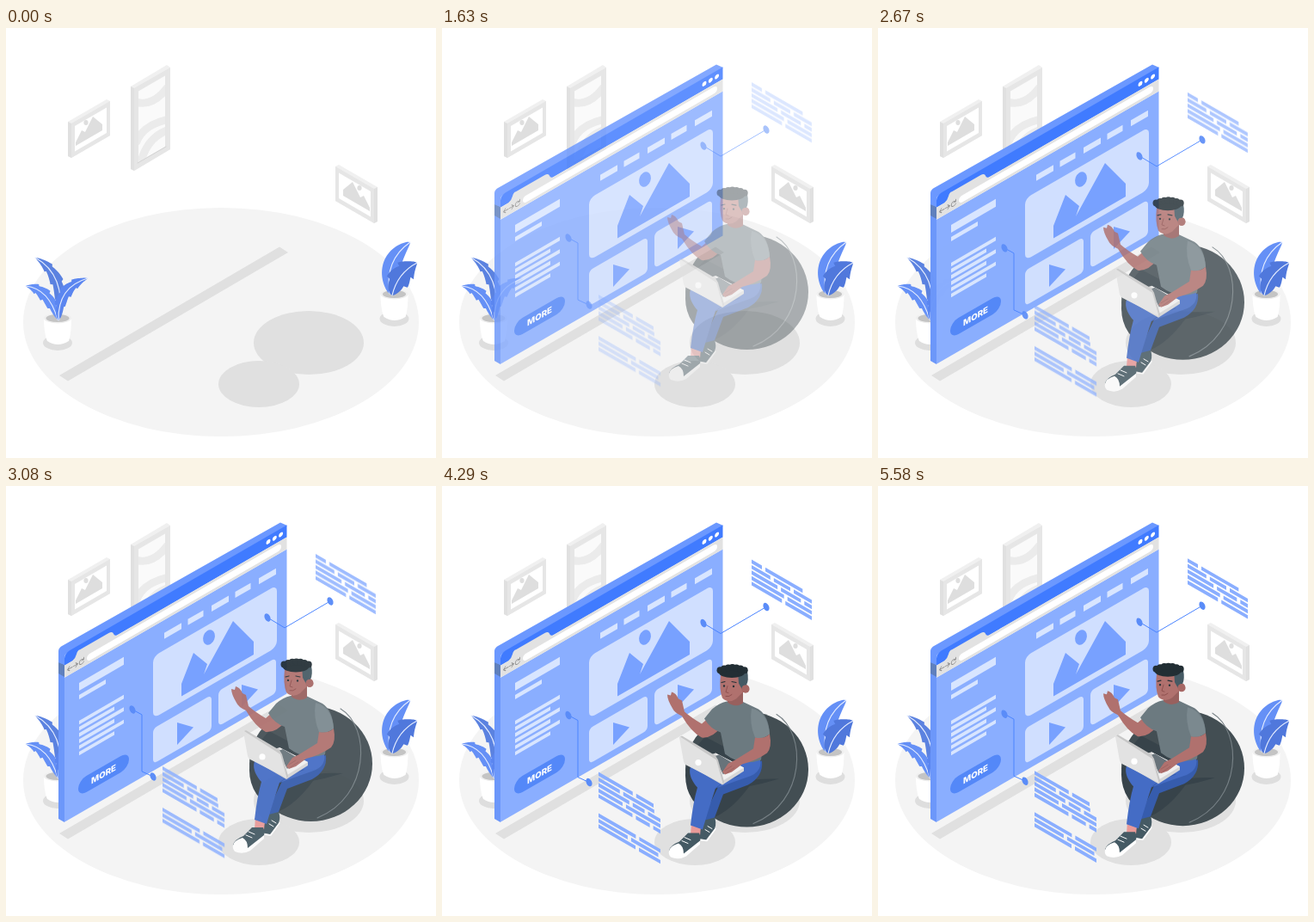
An HTML page for the animation above (5.62 s loop, 500 px wide and 500 px high).

```html
<!DOCTYPE html>
<html lang="en">
<head>
<meta charset="utf-8">
<title>Isometric web page scene</title>
<style>
html, body { margin: 0; width: 100%; height: 100%; overflow: hidden; background: #fff; }
svg { display: block; width: 100vw; height: 100vh; }
text { font: 800 9.7px Inter, "Open Sans", sans-serif; fill: #fff; text-anchor: middle; }
.line { fill: none; stroke-linecap: round; stroke-linejoin: round; }
</style>
</head>
<body>
<svg viewBox="0 0 500 500">
  <ellipse cx="250" cy="342" rx="230" ry="133" fill="#f4f4f4"/>
  <g fill="#e0e0e0">
    <path d="M62 404 318 254.500 328 261 72 410.500Z"/>
    <ellipse cx="352" cy="366" rx="64" ry="37"/>
    <ellipse cx="294" cy="414" rx="47" ry="27"/>
  </g>

  <!-- wall pictures -->
  <g id="picture">
    <path d="M72 109 117 83 121 85V125L76 151 72 149Z" fill="#f0f0f0"/>
    <path d="M72 109 76 111V151L72 149Z" fill="#e0e0e0"/>
    <path d="M76 111 121 85V125L76 151Z" fill="#e6e6e6"/>
    <path d="M80 114 117 92.500V122L80 143.500Z" fill="#fff"/>
    <path d="M81 133 88 119 92 121 101 103 112 112V119L81 137Z" fill="#dedede"/>
    <ellipse cx="93" cy="110" rx="2.600" ry="3" fill="#dedede"/>
  </g>
  <use href="#picture" transform="matrix(-1 0 0 1 504 76)"/>

  <!-- mirror -->
  <path d="M145 68 187 43 191 46V141L149 166 145 164Z" fill="#f0f0f0"/>
  <path d="M145 68 149 70V166L145 164Z" fill="#e0e0e0"/>
  <path d="M149 70 191 46V141L149 166Z" fill="#e6e6e6"/>
  <clipPath id="glass"><path d="M154 73.500 185 55.500V138L154 156Z"/></clipPath>
  <g clip-path="url(#glass)">
    <path d="M150 50H190V160H150Z" fill="#fafafa"/>
    <g class="line" stroke="#ebebeb" stroke-width="9">
      <path d="M150 86Q170 92 187 70M152 132Q160 112 190 106M158 152Q166 126 190 118"/>
    </g>
  </g>
  <path d="M153 157 186 138" class="line" stroke="#d4d4d4"/>

  <!-- plants -->
  <g id="pot">
    <ellipse cx="60" cy="366" rx="17" ry="9" fill="#dedede"/>
    <path d="M44 338C44 350 46 360 48 364Q60 372 73 364C75 358 76 348 76 338Z" fill="#fff"/>
    <ellipse cx="60" cy="337.500" rx="16" ry="6" fill="#f0f0f0"/>
    <ellipse cx="60" cy="337.500" rx="13.500" ry="4.600" fill="#c4c4c4"/>
  </g>
  <use href="#pot" x="391.500" y="-28"/>
  <g id="leaves"></g>

  <g id="page">
    <path d="M61 192 68 195V391L61 387Z" fill="#6c97fa"/>
    <path d="M61 205 68 208V222L61 218Z" fill="#5f80bd"/>
    <path d="M61 205V192Q61 188 66 185.500L319 42.500 327 46 71 194Q68 196 68 200V208Z" fill="#6b98ff"/>
    <g id="front" transform="matrix(1 -.57735 0 1 68 194.700)">
      <path d="M0 28H258.500V196H0Z" fill="#8aaeff"/>
      <path d="M0 14V6Q0 0 6 0H258.500V14Z" fill="#407bff"/>
      <path d="M0 14H9Q13 13 14 9T18 6H51Q56 6 57 10T62 14H258.500V28H0Z" fill="#e2e2e2"/>
      <rect x="26" y="17" width="226" height="8" rx="4" fill="#fff"/>
      <g class="line" stroke="#8a8a8a" stroke-width=".8">
        <path id="arrow" d="M9 21H3.500L6 18.500M3.500 21 6 23.500"/>
        <use href="#arrow" transform="matrix(-1 0 0 1 19 0)"/>
        <path d="M22 19.500A2.700 2.700 0 1 0 22.500 22M22.500 17.500V20H20"/>
      </g>
      <path d="M237 7H252" stroke="#fff" stroke-width="5" stroke-linecap="round" stroke-dasharray="0 7.300"/>
      <g fill="#d0dfff">
        <rect x="103" y="63" width="144" height="72" rx="7"/>
        <rect x="103" y="147" width="68" height="41" rx="5"/>
        <rect x="179" y="147" width="67" height="41" rx="5"/>
      </g>
      <rect x="16" y="157" width="59" height="19" rx="9.500" fill="#5488f8"/>
      <text x="45.500" y="170">MORE</text>
    </g>
    <g fill="#78a1ff">
      <path d="M204 244.500V230L218 194 234 207 230 219 264 157 288 181V196Z"/>
      <ellipse cx="236" cy="176" rx="6.600" ry="9" transform="rotate(20 236 176)"/>
      <path id="play" d="M199 275 218 280.500 199 301Z"/>
      <use href="#play" x="75" y="-44"/>
    </g>
  </g>

  <g id="links">
    <path d="M304 158 324 170 377 139M147 265 158 271V337L171 343" class="line" stroke="#4a84ff"/>
    <g fill="#5a8cf8">
      <ellipse id="dot" cx="304" cy="158" rx="3.200" ry="5" transform="rotate(-25 304 158)"/>
      <use href="#dot" x="73" y="-19"/><use href="#dot" x="-157" y="107"/><use href="#dot" x="-133" y="185"/>
    </g>
  </g>
  <g id="notes" fill="#8aaeff">
    <g id="noteA" transform="matrix(1 .57735 0 1 360 84)"></g>
    <g id="noteB" transform="matrix(1 .57735 0 1 182 331)"></g>
  </g>

  <g id="person">
    <!-- bean bag -->
    <ellipse cx="354.500" cy="328" rx="71.500" ry="67" fill="#434e53"/>
    <path d="M283 335Q284 313 306 290L372 325Q345 372 316 384Q283 367 283 335Z" fill="#37434a"/>
    <path d="M311 353Q350 352 392 339Q365 338 340 343" fill="#37434a"/>
    <path d="M389 264C424 285 424 366 362 391" class="line" stroke="#778186" stroke-width="1.100"/>

    <!-- legs and shoes -->
    <path d="M304 386 316 381Q320 390 317 397L307 410 297 408Z" fill="#455a64"/>
    <path d="M318 397 308 411 299 410" class="line" stroke="#fff" stroke-width="1.500"/>
    <path d="M326 338 372 318Q374 336 356 346L327 357 317 384 302 388Z" fill="#365cad"/>
    <path d="M290 390 301 394 300 405 289 404Z" fill="#e99a98"/>
    <path d="M369 312Q375 331 355 337L318 350Q311 371 303 398L289 393Q292 366 297 349C287 338 284 324 296 318L335 322Z" fill="#446cc5"/>
    <path d="M318 350Q330 340 346 335" class="line" stroke="#365cad"/>
    <path d="M264 422Q266 416 276 412L286 402 299 402Q302 408 299 414L282 428 267 428Z" fill="#455a64"/>
    <path d="M264 423Q265 417 275 414Q281 417 281 426L300 411V415L284 429Q275 434 266 430Q263 427 264 423Z" fill="#fff"/>
    <path d="M279 411 286 414M282 407 289 410M306 398 311 401M309 394 314 397" class="line" stroke="#fff"/>

    <!-- raised arm -->
    <path d="M310 268 325 278Q315 292 302 291Q290 285 279 266Q270 262 268 257Q262 247 262 241L266 242 267 238Q272 239 275 246L279 248 282 261Q290 268 302 275Z" fill="#b0716e"/>

    <!-- shirt -->
    <path d="M331 249Q322 251 314 258L305 269Q312 281 324 285L329 310Q348 325 371 317L374 291 381 287Q380 266 368 258L349 249Z" fill="#6c7a80"/>
    <path d="M360 257Q379 262 381 287Q373 293 364 291Q357 274 360 257Z" fill="#7b898f"/>

    <!-- head -->
    <path d="M332 240 350 235V251Q341 257 332 250Z" fill="#98605e"/>
    <path d="M324 218Q322 235 326 245Q333 252 342 246L350 238Q357 239 357 233Q356 228 351 230L350 215Z" fill="#b0716e"/>
    <path d="M344 214H355Q357 224 354 230L350 231 349 235 345 228Z" fill="#455a64"/>
    <circle cx="353" cy="234.500" r="4.600" fill="#a76865"/>
    <g id="hair" fill="#222e34"><ellipse cx="337" cy="215.500" rx="15" ry="6"/></g>
    <path d="M328 231h0M339 231.500h0" class="line" stroke="#263238" stroke-width="2.400"/>
    <path d="M325 227 329 226M337 226 342 227" class="line" stroke="#263238" stroke-width="1.100"/>
    <path d="M332 231 330 238 333 239M330 243Q334 244 337 241" class="line" stroke="#8c4d4c" stroke-width=".9"/>

    <!-- laptop -->
    <path d="M283 321 318 309 351 326V330L326 346Z" fill="#d6d6d6"/>
    <path d="M318 309 351 326 327 341Z" fill="#f0f0f0"/>
    <path d="M316 313 322 311 339 321 327 334Z" fill="#68737a"/>
    <path d="M276 291Q276 289 279 290L317 313Q319 314 320 317L327 345 284 323Q282 322 281 319Z" fill="#e2e2e2"/>
    <path d="M277 290 279 289 318 312 321 317 328 342 327 346 319 317Z" fill="#c7c7c7"/>
    <circle cx="298" cy="320" r="3.600" fill="#fff"/>

    <!-- typing arm -->
    <path d="M364 291Q374 293 381 287Q384 302 378 309Q365 318 349 322L337 331 329 334 326 331 333 321 341 317 362 304Z" fill="#b0716e"/>
    <path d="M329 329 337 324M331 332 340 326" class="line" stroke="#98605e" stroke-width=".8"/>
  </g>
</svg>
<script>
const LOOP = 5620, DROP = 30;
const $ = id => document.getElementById(id);

function add(parent, tag, attrs) {
  const el = document.createElementNS("http://www.w3.org/2000/svg", tag);
  for (const key in attrs) el.setAttribute(key, attrs[key]);
  $(parent).append(el);
}

let seed = 7;
const random = () => (seed = seed * 16807 % 2147483647) / 2147483647;

function bar(parent, x, y, width, height, fill) {
  add(parent, "rect", { x, y, width, height, ...(fill && { fill }) });
}

// Lines of words with random breaks, filling a column.
function lines(parent, count, top, width) {
  for (let row = 0; row < count; row++)
    for (let x = 0; x < width - 8;) {
      const length = Math.min(12 + random() * 34, width - x);
      bar(parent, x, top + row * 6.4, length, 4.4);
      x += length + 4;
    }
}

// A curved leaf; cuts is the number of notches along each edge.
function leaf(base, bend, tip, width, cuts, fill) {
  const left = [], right = [], steps = 48;
  for (let i = 0; i <= steps; i++) {
    const t = i / steps, u = 1 - t;
    const [x, y] = [0, 1].map(k => u * u * base[k] + 2 * u * t * bend[k] + t * t * tip[k]);
    const [dx, dy] = [0, 1].map(k => u * (bend[k] - base[k]) + t * (tip[k] - bend[k]));
    const half = width * Math.sin(Math.PI * t) ** .7 * (1 - .35 * (t * cuts % 1)) / Math.hypot(dx, dy);
    left.push([x - dy * half, y + dx * half]);
    right.unshift([x + dy * half, y - dx * half]);
  }
  add("leaves", "path", { d: `M${left.concat(right).join(" ")}Z`, fill });
  add("leaves", "path", { d: `M${base}Q${bend} ${tip}`, class: "line", stroke: "#e5edff", "stroke-width": 1.1 });
}

leaf([62, 339], [70, 287], [34, 267], 8, 4, "#5b82e0");
leaf([60, 339], [50, 303], [23, 300], 8, 4, "#6590f6");
leaf([61, 340], [60, 301], [95, 291], 8, 4, "#5b86f0");
leaf([446, 309], [440, 270], [470, 249], 10, 0, "#6590f6");
leaf([449, 311], [455, 285], [478, 273], 15, 3, "#5078dc");

// Menu, headings and paragraph on the page.
const pale = "#d8e5ff";
for (let i = 0; i < 5; i++) bar("front", 116 + i * 27.5, 43, i % 2 ? 18 : 20, 7, pale);
bar("front", 17, 44, 52, 9, pale);
bar("front", 17, 58, 31, 5, pale);
for (let i = 0; i < 6; i++) bar("front", 17, 88 + i * 7.2, i % 2 ? 41 : 52, 4.4, pale);

lines("noteA", 5, 0, 70);
lines("noteB", 5, 0, 72);
lines("noteB", 3, 48, 72);

for (let i = 0; i < 7; i++)
  add("hair", "circle", { cx: 323.5 + i * 4.7, cy: 213.5 - 4 * Math.sin(Math.PI * (i + .5) / 7), r: 4 });

// cubic-bezier(.36, -.01, .5, 1.38)
function ease(x) {
  const curve = (s, a, b) => 3 * (1 - s) ** 2 * s * a + 3 * (1 - s) * s * s * b + s ** 3;
  let lo = 0, hi = 1;
  for (let i = 0; i < 24; i++) {
    const mid = (lo + hi) / 2;
    if (curve(mid, .36, .5) < x) lo = mid; else hi = mid;
  }
  return curve(lo, -.01, 1.38);
}

// Stacked translucent layers build up faster than a single one.
const layers = { page: 5, links: 2, notes: 1, person: 1.5 };

function draw(now) {
  const p = ease(now % LOOP / LOOP);
  const alpha = Math.min(1, Math.max(0, p));
  for (const id in layers) {
    $(id).setAttribute("opacity", 1 - (1 - alpha) ** layers[id]);
    if (id !== "page") $(id).setAttribute("transform", `translate(0 ${DROP * (p - 1)})`);
  }
}

const start = performance.now();
function tick() {
  draw(performance.now() - start);
  requestAnimationFrame(tick);
}
tick();
</script>
</body>
</html>
```
